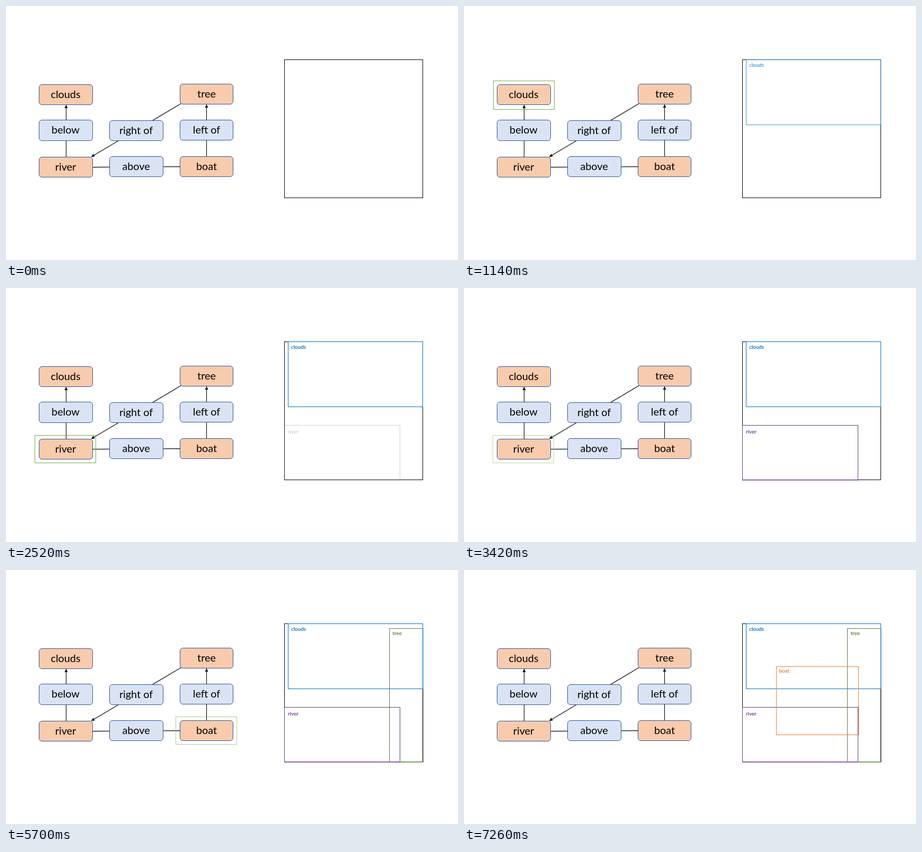
These frames come from a looping animation (853 px wide and 480 px high, 8 s). An HTML page:

```html
<!DOCTYPE html>
<html lang="en">
<head>
<meta charset="utf-8">
<title>Scene graph to layout</title>
<style>
  html, body { margin: 0; width: 100%; height: 100%; overflow: hidden; background: #fff; }
  svg { display: block; width: 853px; height: 480px; }
  text { font-family: Lato, Carlito, sans-serif; }
  .node { font-size: 19.8px; text-anchor: middle; }
  .label { font-size: 9.9px; stroke-width: .2px; }
</style>
</head>
<body>
<svg id="stage" viewBox="0 0 853 480"></svg>
<script>
const stage = document.getElementById('stage');
const LOOP = 8000, TICK = 60, START = 35;
const IN = 450, GROW = 900, OUT = 450, CYCLE = IN + GROW + OUT;

function add(parent, tag, attrs, content) {
  const el = document.createElementNS('http://www.w3.org/2000/svg', tag);
  for (const k in attrs) el.setAttribute(k, attrs[k]);
  if (content) el.textContent = content;
  parent.appendChild(el);
  return el;
}

const line = (parent, x1, y1, x2, y2, stroke, width = 1) =>
  add(parent, 'line', { x1, y1, x2, y2, stroke, 'stroke-width': width });

const frame = (parent, x1, y1, x2, y2, stroke) =>
  add(parent, 'rect', { x: x1, y: y1, width: x2 - x1, height: y2 - y1, fill: 'none', stroke });

function arrow(x1, y1, x2, y2) {
  line(stage, x1, y1, x2, y2, '#000', 1.1);
  const turn = Math.atan2(y2 - y1, x2 - x1) * 180 / Math.PI;
  add(stage, 'path', { d: 'M0 0L-6 -3V3Z', transform: `translate(${x2} ${y2}) rotate(${turn})` });
}

function node(name, x, y, h, fill) {
  add(stage, 'rect', { x, y, width: x > 300 ? 100 : 101, height: h, rx: 5.5, fill, stroke: '#2f5597' });
  add(stage, 'text', { class: 'node', x: x + 50, y: y + 25.5 }, name);
}

// Graph
arrow(113.5, 286, 113.5, 187);
arrow(378.5, 285, 378.5, 186);
arrow(331, 184, 161, 285);
line(stage, 163, 304.6, 329, 303.6, '#000', 1.1);

const THING = '#f8cbad', RELATION = '#dae3f3';
node('clouds', 62.5, 148.5, 38, THING);
node('tree', 328.5, 147.5, 38, THING);
node('river', 62.5, 285.5, 38, THING);
node('boat', 328.5, 284.5, 38, THING);
node('below', 62.5, 215.5, 39, RELATION);
node('right of', 195.5, 216.5, 38, RELATION);
node('left of', 328.5, 215.5, 38, RELATION);
node('above', 195.5, 284.5, 38, RELATION);

// Layout canvas
frame(stage, 525.5, 101.5, 786.5, 362.5, '#000');

// Each step: highlight rectangle, label, and the box drawing
const steps = [
  { mark: [55.5, 141.5, 170.5, 195.5], name: 'clouds', at: [538, 115], color: '#0070c0',
    draw: g => frame(g, 532.5, 101.5, 786.5, 224.5, '#0070c0') },
  { mark: [54.5, 278.5, 169.5, 330.5], name: 'river', at: [532, 275], color: '#7030a0',
    draw: g => {
      frame(g, 525.5, 259.5, 743.5, 362.5, '#56456e');
      line(g, 525, 362.75, 744, 362.75, '#7030a0', 1.5);
    } },
  { mark: [320.5, 139.5, 435.5, 192.5], name: 'tree', at: [729.5, 123], color: '#548235',
    draw: g => {
      line(g, 723.5, 110, 723.5, 363, '#5f7a50');
      line(g, 723, 110.5, 787, 110.5, '#548235');
      line(g, 787.25, 110, 787.25, 225, '#0070c0', .5);
      line(g, 787.25, 225, 787.25, 363, '#22301a', .5);
      line(g, 744, 362.75, 787.5, 362.75, '#548235', 1.5);
    } },
  { mark: [320.5, 277.5, 435.5, 329.5], name: 'boat', at: [594.5, 194], color: '#ed7d31',
    draw: g => frame(g, 589.5, 182.5, 744.5, 311.5, '#ed7d31') }
];

for (const s of steps) {
  s.box = add(stage, 'g', { opacity: 0 });
  s.draw(s.box);
  add(s.box, 'text', { class: 'label', x: s.at[0], y: s.at[1], fill: s.color, stroke: s.color }, s.name);
  s.halo = frame(stage, ...s.mark, '#70ad47');
}

const ramp = (t, from, span) => Math.min(1, Math.max(0, (t - from) / span));

function render(ms) {
  const t = Math.floor(ms % LOOP / TICK) * TICK;
  steps.forEach((s, i) => {
    const t0 = START + i * CYCLE;
    s.halo.setAttribute('opacity', ramp(t, t0, IN) - ramp(t, t0 + IN + GROW, OUT));
    s.box.setAttribute('opacity', ramp(t, t0 + IN, GROW));
  });
}

const begin = performance.now();
function tick() {
  render(performance.now() - begin);
  requestAnimationFrame(tick);
}
render(0);
requestAnimationFrame(tick);
</script>
</body>
</html>
```
